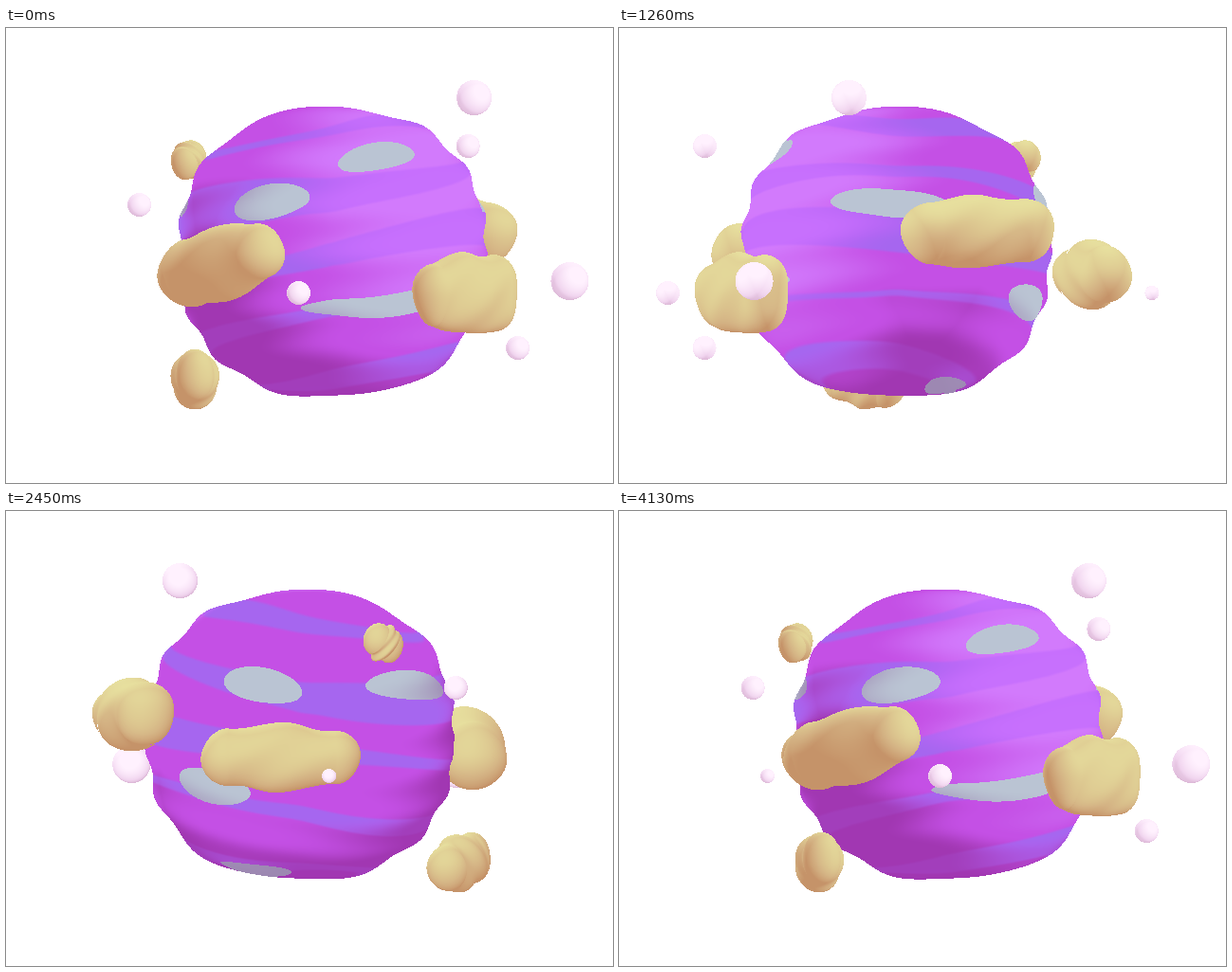
An HTML page with a canvas that plays this animation: 640x480 px, repeating every 4.2 s.

```html
<!DOCTYPE html>
<html lang="en">
<head>
<meta charset="utf-8">
<title>Spinning planet</title>
<style>
html, body { margin: 0; width: 100%; height: 100%; overflow: hidden; background: #fff; }
canvas { display: block; }
</style>
</head>
<body>
<canvas id="stage" width="640" height="480"></canvas>
<script>
const W = 640, H = 480, STEPS = 60, STEP_MS = 70, AXIS = 320;
const ctx = document.getElementById('stage').getContext('2d');
const RAD = Math.PI / 180;

const dot = (p, x, y, z) => p[0] * x + p[1] * y + p[2] * z;
const cross = (p, q) => [p[1] * q[2] - p[2] * q[1], p[2] * q[0] - p[0] * q[2], p[0] * q[1] - p[1] * q[0]];
const scale = (p, k) => p.map(c => c * k);
const unit = p => scale(p, 1 / Math.hypot(...p));
const clamp = t => t < 0 ? 0 : t > 1 ? 1 : t;
const lerp = (a, b, t) => a + (b - a) * t;
const smooth = (a, b, t) => { t = clamp((t - a) / (b - a)); return t * t * (3 - 2 * t); };
const mix = (a, b, t) => [lerp(a[0], b[0], t), lerp(a[1], b[1], t), lerp(a[2], b[2], t)];
const ramp = (c, t) => t < 0.5 ? mix(c[0], c[1], t * 2) : mix(c[1], c[2], t * 2 - 1);
const wrap = d => Math.max(0, (d + 0.2) / 1.2);

function polar(az, lat) {
  const a = az * RAD, l = lat * RAD;
  return [Math.cos(l) * Math.sin(a), Math.sin(l), Math.cos(l) * Math.cos(a)];
}

// Everything orbits one vertical axis: azimuth in degrees, distance from it, height on screen, radius.
const orb = (az, dist, y, r = 12.5) => ({ az, dist, y, r });
// A cloud is a swollen capsule between two orbs, stretched upright by `tall`.
const cloud = (tall, from, to) => ({ tall, from, to });

const balls = [
  orb(81.5, 175, 73, 18.5), orb(41.6, 251, 124), orb(268.7, 180, 186), orb(-2.4, 287, 279),
  orb(214.6, 252, 279, 7.5), orb(70.3, 291, 266.5, 20), orb(52, 278, 337)
];
const clouds = [
  cloud(1.05, orb(-44.5, 178, 258, 35), orb(-13.9, 229, 235, 28)),
  cloud(1.5, orb(35, 228, 281, 22), orb(59.7, 224, 279, 26)),
  cloud(1, orb(111, 198, 216, 33), orb(142.5, 189, 213, 32)),
  cloud(1.15, orb(184, 198, 259, 27), orb(219, 174, 260, 25)),
  cloud(1.2, orb(240, 145, 135, 15), orb(245, 145, 143, 15)),
  cloud(1.2, orb(-43, 178, 365, 21), orb(-56, 146, 376, 21))
];
const body = orb(47.5, 32.5, 236.5);
const RX = 162, RY = 152.5, ROUND = 2.3;
const pole = polar(-95, 79.5);

const bands = Array.from({ length: 5 }, (_, i) => ({
  mid: 0.8 - 0.41 * i,
  half: 0.085 + 0.04 * Math.sin(i * 1.6 - 0.6)
}));

// Grey ovals lie along the tilted stripes; the longer they are, the flatter.
function oval(az, lat, w) {
  const mid = polar(az, lat), east = unit(cross(pole, mid));
  return { mid, u: scale(east, 1 / w), v: scale(cross(mid, east), Math.sqrt(w) / 0.063) };
}
const ovals = [
  ...[-25, 106, 195, 259].map((az, i) => oval(az, 20, i % 2 ? 0.38 : 0.26)),
  oval(27, -20, 0.6), oval(173, -20, 0.28), oval(22, 41, 0.27), oval(162, -67, 0.24)
];

const YELLOW = [[190, 132, 92], [212, 179, 132], [232, 226, 160]];
const PINK = [[208, 166, 200], [240, 212, 238], [255, 241, 254]];

function render(step) {
  const img = new ImageData(W, H), px = img.data.fill(255);
  const depth = new Float32Array(W * H).fill(-1e4);
  const turn = step * 360 / STEPS;
  const cs = Math.cos(turn * RAD), sn = Math.sin(turn * RAD);
  const key = polar(45 - turn, 28), fill = polar(200 - turn, 25);

  function place({ az, dist, y, r }) {
    const a = (az - turn) * RAD;
    return { x: AXIS + dist * Math.sin(a), y, z: dist * Math.cos(a), r };
  }

  function plot(x, y, z, color) {
    const i = y * W + x;
    if (z <= depth[i]) return;
    depth[i] = z;
    px.set(color, i * 4);
  }

  function scan(x0, y0, x1, y1, fn) {
    x0 = Math.max(0, Math.floor(x0)); x1 = Math.min(W - 1, Math.ceil(x1));
    y0 = Math.max(0, Math.floor(y0)); y1 = Math.min(H - 1, Math.ceil(y1));
    for (let y = y0; y <= y1; y++) for (let x = x0; x <= x1; x++) fn(x, y);
  }

  function lit(nx, ny, nz) {
    return clamp(0.16 + 0.72 * wrap(dot(key, nx, ny, nz)) + 0.7 * wrap(dot(fill, nx, ny, nz)));
  }

  function planet() {
    const c = place(body);
    scan(c.x - RX * 1.04, c.y - RY * 1.04, c.x + RX * 1.04, c.y + RY * 1.04, (x, y) => {
      const ex = (x - c.x) / RX, ey = (c.y - y) / RY;
      const rho = (Math.abs(ex) ** ROUND + Math.abs(ey) ** ROUND) ** (1 / ROUND);
      const len = Math.hypot(ex, ey) || 1;
      // ridges push the outline in and out
      const rim = dot(pole, ex / len * cs, ey / len, -ex / len * sn);
      if (rho > 1 + 0.016 * Math.sin(20 * rim)) return;

      const k = Math.min(rho, 1) / len, nx = ex * k, ny = ey * k;
      const nz = Math.sqrt(Math.max(0, 1 - nx * nx - ny * ny));
      const bx = nx * cs + nz * sn, bz = nz * cs - nx * sn;
      const az = Math.atan2(bx, bz), v = dot(pole, bx, ny, bz);
      const relief = 0.07 * Math.cos(20 * v + Math.sin(az * 2));

      const main = wrap(dot(key, nx, ny, nz)) + relief;
      const total = main + 0.8 * wrap(dot(fill, nx, ny, nz));
      const shade = smooth(0.05, 0.45, total), glow = smooth(0.45, 0.95, main);
      let color = mix(mix([161, 55, 178], [196, 80, 229], shade), [210, 122, 252], glow);

      let band = 0;
      for (const { mid, half } of bands) {
        const d = Math.abs(v - mid - 0.03 * Math.sin(az * 2 + mid * 9));
        const w = half * (0.8 + 0.45 * Math.sin(az + mid * 7));
        band = Math.max(band, 1 - smooth(w - 0.012, w + 0.012, d));
      }
      const blue = mix([166, 102, 239], [193, 106, 254], glow);
      color = mix(color, blue, band * (0.15 + 0.85 * shade) * (1 - 0.35 * glow));

      for (const o of ovals) {
        const inside = Math.hypot(dot(o.u, bx, ny, bz), dot(o.v, bx, ny, bz)) < 1;
        if (inside && dot(o.mid, bx, ny, bz) > 0) {
          color = mix([157, 136, 178], [186, 196, 211], smooth(0.1, 0.65, total));
        }
      }
      plot(x, y, c.z + RX * nz, color);
    });
  }

  function drawBall(b) {
    const { x: cx, y: cy, z: cz, r } = place(b);
    scan(cx - r, cy - r, cx + r, cy + r, (x, y) => {
      const nx = (x - cx) / r, ny = (cy - y) / r, q = nx * nx + ny * ny;
      if (q > 1) return;
      const nz = Math.sqrt(1 - q);
      plot(x, y, cz + r * nz, ramp(PINK, clamp(lit(nx, ny, nz) + 0.28 * nz)));
    });
  }

  function drawCloud({ tall, from, to }) {
    const a = place(from), b = place(to);
    const ux = b.x - a.x, uy = b.y - a.y, uz = b.z - a.z;
    const span = ux * ux + uy * uy + uz * uz;
    const dist = (x, y, z) => {
      const dx = x - a.x, dy = y - a.y, dz = z - a.z;
      const h = clamp((dx * ux + dy * uy + dz * uz) / span);
      const bulge = 1 + 0.18 * Math.sin(Math.PI * h) ** 2;
      const lump = 1.4 * Math.sin(8 * h + y * 0.1);
      return Math.hypot(dx - ux * h, (dy - uy * h) / tall, dz - uz * h) - lerp(a.r, b.r, h) * bulge - lump;
    };
    const pad = Math.max(a.r, b.r) * 1.25 + 4;
    const low = k => Math.min(a[k], b[k]) - pad, high = k => Math.max(a[k], b[k]) + pad;
    const near = high('z'), far = low('z'), rise = pad * (tall - 1);

    scan(low('x'), low('y') - rise, high('x'), high('y') + rise, (x, y) => {
      let z = near, d = 1;
      for (let i = 0; i < 60 && z > far; i++) {
        d = dist(x, y, z);
        if (d < 0.3) break;
        z -= Math.max(0.6, d * 0.85);
      }
      if (d >= 0.3) return;
      const n = unit([dist(x + 1, y, z) - d, d - dist(x, y + 1, z), dist(x, y, z + 1) - d]);
      plot(x, y, z, ramp(YELLOW, lit(...n)));
    });
  }

  planet();
  balls.forEach(drawBall);
  clouds.forEach(drawCloud);
  return img;
}

const cache = [];
const start = performance.now();
let shown = -1;

function tick() {
  const step = Math.floor((performance.now() - start) / STEP_MS) % STEPS;
  if (step !== shown) {
    cache[step] = cache[step] || render(step);
    ctx.putImageData(cache[step], 0, 0);
    shown = step;
  }
  requestAnimationFrame(tick);
}
tick();
</script>
</body>
</html>
```
